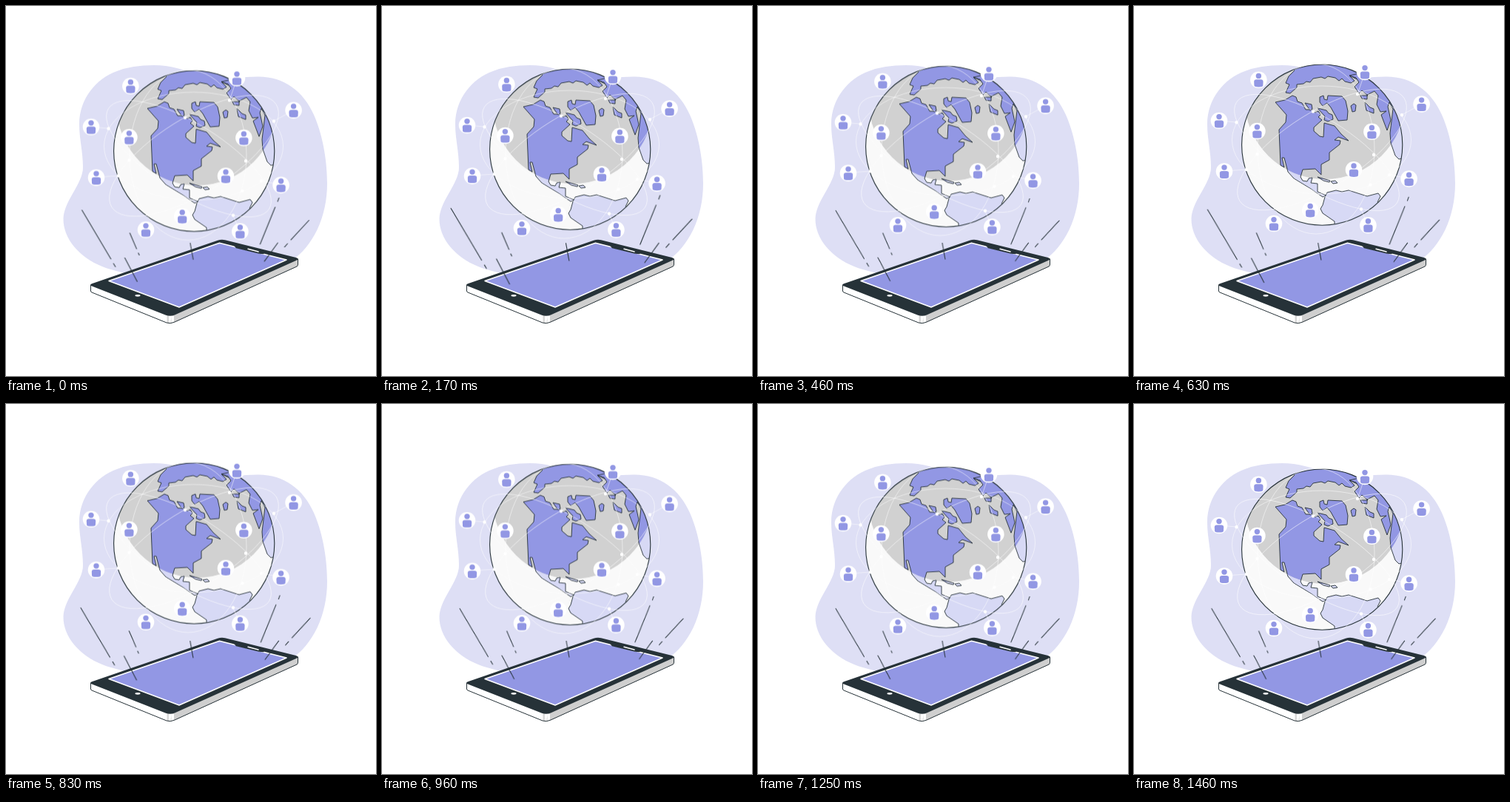
These frames come from a looping animation (500 px wide and 500 px high, 1.5 s). An HTML page:

```html
<!DOCTYPE html>
<html lang="en">
<head>
<meta charset="utf-8">
<title>Connected globe</title>
<style>
  html, body { margin: 0; width: 100%; height: 100%; overflow: hidden; background: #fff; }
  svg { display: block; width: 100vw; height: 100vh; }
  :root { --ink: #263238; --main: #9297e4; --pale: #dedff5; }

  .ink { fill: none; stroke: var(--ink); stroke-linecap: round; stroke-linejoin: round; }
  .coast { stroke: var(--ink); stroke-width: .9; stroke-linejoin: round; }
  .net { fill: none; stroke: #fff; stroke-width: .8; stroke-opacity: .65; }
  .dots { fill: none; stroke: #fff; stroke-width: 4.4; stroke-linecap: round; }

  .float { animation: float 1.5s linear -41.7ms infinite; }
  .beat { animation: beat 1.5s linear -41.7ms infinite; transform-origin: 256px 316px; }

  @keyframes float {
    50% { transform: translateY(-10px); }
  }
  @keyframes beat {
    0%, 28.5%, 41.5%, 61%, 100% { transform: scale(1); }
    18%, 50.5% { transform: scale(1.1); }
  }
</style>
</head>
<body>
<svg viewBox="0 0 500 500">
  <defs>
    <clipPath id="ball"><circle cx="254.2" cy="196.6" r="108.6"/></clipPath>
    <clipPath id="shade"><circle cx="258" cy="134.5" r="108.5"/></clipPath>

    <g id="land">
      <!-- Arctic Asia -->
      <path d="M208 80 L217 96 209 104 205 113 210 115 205 126 211 127 220 119 220 115 229 114
        233 111 238 112 242 107 253 105 258 107 262 104 272 106 277 110 281 107 285 111 293 113
        298 110 291 103 310 112V80Z"/>
      <!-- Europe and Africa -->
      <path d="M291 103 L300 106 304 112 298 118 304 127 308 123 316 130 306 130 308 134 315 135
        315 129 325 124 330 130 328 142 333 152 341 151 334 156 342 177 347 163 343 145 345 139
        350 148 346 181 347 194 353 211 358 216 366 214 374 180 350 90Z"/>
      <!-- North America -->
      <path d="M191 139 L204 136 214 130 219 132 221 138 227 140 232 149 241 149 245 153 249 151
        252 156 249 159 254 163 243 173 243 178 251 185 256 186 257 167 271 171 280 182 290 191
        276 186 271 190 279 191 278 196 264 207 264 217 253 223 253 237 245 229 228 230 225 240
        228 245 234 246 236 242 241 241 239 248 248 249 248 260 260 265 255 267 239 256 216 242
        208 233 203 214 200 214 203 227 198 224 196 176 205 166 206 156Z"/>
      <!-- South America -->
      <path d="M258 267 L261 261 273 258 281 260 290 258 315 266 330 262 333 266 329 274 345 290
        300 330 271 320V300L255 289 252 283 255 278Z"/>
      <!-- Greenland -->
      <path d="M251 132 L256 130 257 135 261 136 262 130 281 131 286 137 289 151 288 163 276 164
        266 146 261 140 255 144 251 139Z"/>
      <!-- islands -->
      <path d="M248 147 L260 150 263 154 268 156 269 162 262 165 257 163 258 158Z"/>
      <path d="M231 140 L240 142 241 148 238 150Z"/>
      <path d="M293 144 L297 141 300 143 299 151 295 152Z"/>
      <path d="M312 139 L319 146 324 148V154L314 150Z"/>
      <path d="M248 240 L265 245 264 247 256 245Z"/>
      <path d="M266 246 L272 245 275 248 269 249Z"/>
    </g>

    <g id="user">
      <circle r="11.3" fill="#fff"/>
      <g fill="#9297e4">
        <circle cy="-5.4" r="3.7"/>
        <path d="M-6.2 2.6 Q-6.2-.6-3-.6 H3 Q6.2-.6 6.2 2.6 L5.9 8 Q5 9.6 0 9.6 T-5.9 8Z"/>
      </g>
    </g>
  </defs>

  <path fill="var(--pale)" d="M200 80 C222 80 240 86 262 94 S305 96 340 95.5
    S402 115 416 147 S434 215 434 240 C434 285 415 325 385 345 L250 380
    C200 366 160 364 130 352 S77 315 77.5 287 C79 262 104 240 104 218
    S99 180 99 160 C99 125 122 98 150 88 Q170 80 200 80Z"/>

  <g class="float">
    <g clip-path="url(#ball)">
      <circle cx="254.2" cy="196.6" r="109" fill="#f9f9f9"/>
      <use href="#land" class="coast" fill="#d7d9f5"/>
      <g clip-path="url(#shade)">
        <circle cx="258" cy="134.5" r="109" fill="#d1d1d1"/>
        <use href="#land" class="coast" fill="#9297e4"/>
      </g>
    </g>
    <circle class="ink" cx="254.2" cy="196.6" r="108.6" stroke-width="1.1"/>

    <g class="net">
      <ellipse rx="128" ry="47" transform="translate(247 207) rotate(32)"/>
      <ellipse rx="131" ry="51" transform="translate(254 203) rotate(-32)"/>
      <ellipse cx="246" cy="202" rx="79" ry="115"/>
      <ellipse cx="253.5" cy="190" rx="121" ry="73"/>
      <path d="M302 128l10-29M362 156l26-14M138 166l-23-2M152 230l-30 2M345 237l26 5M307 284l9 21"/>
    </g>
    <path class="dots" d="M242 151.5h0M302 128h0M324 210h0M307 283.5h0M138.5 166.3h0M362 156.3h0
      M152 230h0M345 237h0M166.5 209h0M319.5 250.5h0"/>

    <use href="#user" x="168.4" y="108.8"/>
    <use href="#user" x="312" y="98"/>
    <use href="#user" x="388.6" y="141.5"/>
    <use href="#user" x="115" y="164"/>
    <use href="#user" x="166.4" y="178"/>
    <use href="#user" x="321.4" y="178.8"/>
    <use href="#user" x="122" y="232.5"/>
    <use href="#user" x="297" y="230.3"/>
    <use href="#user" x="371.6" y="242.6"/>
    <use href="#user" x="238.2" y="284.8"/>
    <use href="#user" x="189" y="303"/>
    <use href="#user" x="316.4" y="305.2"/>
  </g>

  <g stroke-linejoin="round">
    <path fill="#fff" d="M114.5 377V385Q114.5 386.5 116 387L217 428Q222 430 227 427.5V418Z"/>
    <path fill="#cfcfcf" d="M224 419L394.5 342V349Q394.5 351 393 352L228 427 222 428.8Z"/>
    <path fill="#d8d8d8" d="M217.5 418H220V428.8L217.5 428Z"/>
    <path fill="#fff" d="M223.5 419H227V427.3L223.5 428.8Z"/>
    <path class="ink" d="M114.5 377V385Q114.5 386.5 116 387L217 428Q222 430 228 427L393 352
      Q394.5 351 394.5 349V342"/>
    <path fill="#263238" d="M116 375.3L286 316.8Q291 315 296 316.2L392 340Q396.5 341.5 393 343.5
      L228 417.5Q222 420 216 417.8L116 378.5Q112.5 377 116 375.3Z"/>
    <path fill="#9297e4" stroke="#fff" stroke-width="1.5" d="M139 371.5L288.5 320.2 379 343 234 407Z"/>
    <path fill="#263238" d="M308 324L311 327.2 342 334.8 348 335.3 350 333Z"/>
    <path fill="none" stroke="#fff" stroke-width="1.5" stroke-linecap="round" d="M327 328.3L341 332"/>
    <ellipse cx="178" cy="391.3" rx="3.6" ry="1.4" fill="#fff"/>
  </g>

  <path class="ink beat" d="M105 276.5L143.5 341.5M147 347.5l2.5 4.3M168.7 307l9 21M180 333.5l1.2 2.7
    M162 340L178.5 371.5M249 320.3l4 21.7M365.5 320L347.7 344.5M362 272.5L342 321.8M367 260.3l-1.7 4.7
    M407 290l-24 26M378.5 321l-4 4.5"/>
</svg>
</body>
</html>
```
